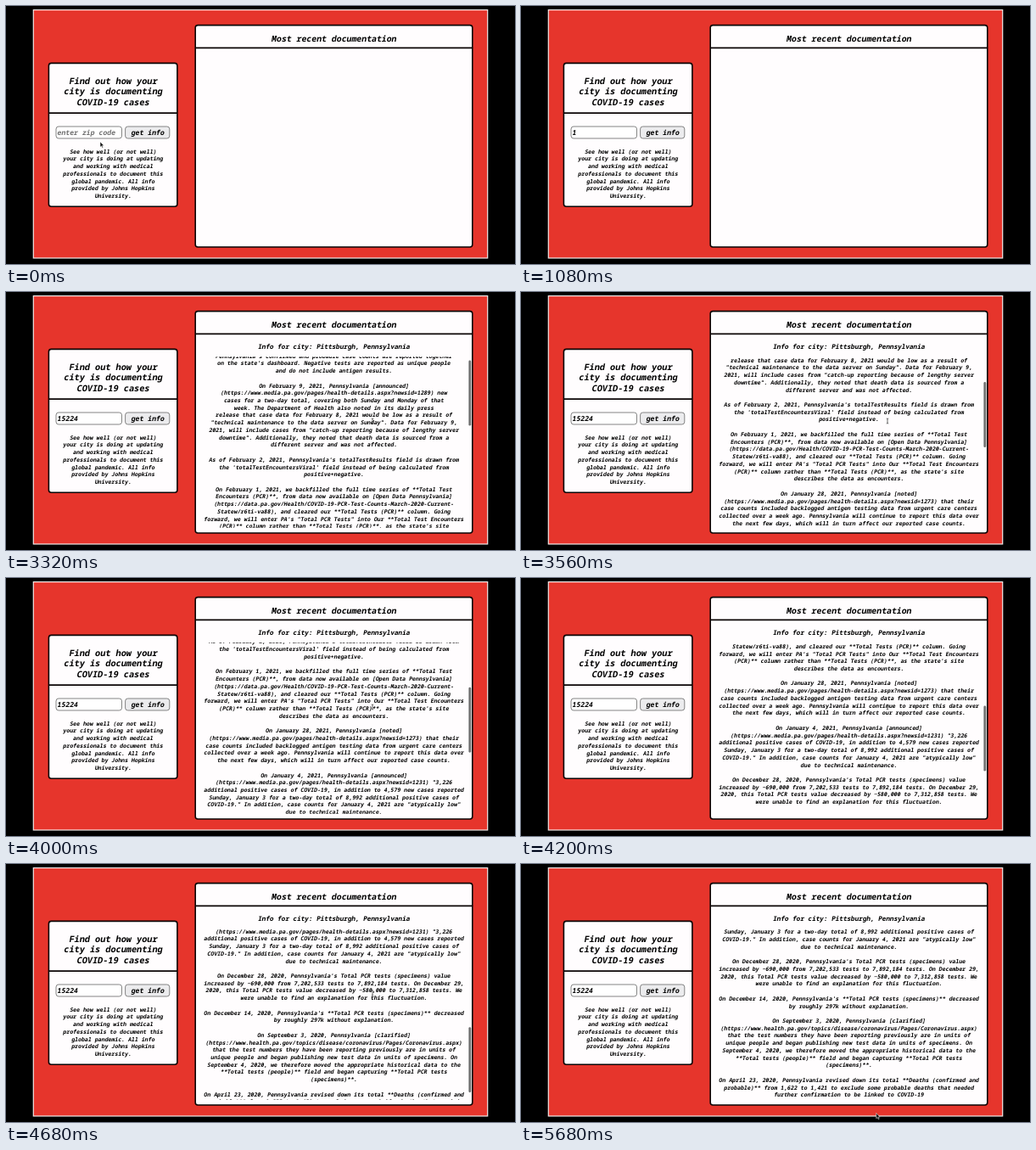
Write an HTML page that moves like this. It is 600 px wide and 304 px high and loops after 5760 ms.

```html
<!DOCTYPE html>
<html lang="en">
<head>
<meta charset="utf-8">
<title>COVID-19 documentation</title>
<style>
  html, body { margin: 0; width: 100%; height: 100%; overflow: hidden; background: #000; }
  svg { display: block; width: 600px; height: 304px; }
  text {
    font-family: "Noto Sans Mono", "DejaVu Sans Mono", monospace;
    font-weight: 700;
    text-rendering: geometricPrecision;
    white-space: pre;
  }
  .panel { fill: #fffdfe; stroke: #0a0505; stroke-width: 1.6; }
  .rule { stroke: #0a0505; stroke-width: 1.6; }
  .field { stroke: #767676; stroke-width: .9; }
</style>
</head>
<body>
<svg viewBox="0 0 600 304">
  <defs><clipPath id="view"><rect x="224" y="76.3" width="325" height="201.4"/></clipPath></defs>
  <rect width="600" height="304"/>
  <rect x="32.3" y="4.6" width="535.4" height="292.4" fill="#e6352c" stroke="#f4e9e8" stroke-width="1.2"/>

  <rect class="panel" x="50.4" y="67.4" width="151.5" height="168.8" rx="3"/>
  <path class="rule" d="M50 126.1H202"/>
  <rect class="field" id="input" x="59" y="142" width="77.5" height="14" rx="3" fill="#fff"/>
  <rect class="field" x="140.6" y="142" width="52.2" height="14" rx="3" fill="#ececee"/>
  <g id="form"></g>

  <rect class="panel" x="223.2" y="22.6" width="326.6" height="261.4" rx="3"/>
  <path class="rule" d="M223 49.4H550"/>
  <g id="results"></g>
  <g clip-path="url(#view)"><g id="notes"></g></g>
  <rect id="thumb" x="545.4" width="2.8" height="77" rx="1.4" fill="#707070"/>

  <path id="arrow" d="M0 0V6.3L1.5 5L2.5 7.3L3.5 6.9L2.5 4.6H4.5Z" fill="#111" stroke="#fff" stroke-width=".5"/>
  <path id="beam" d="M-1.2-3Q0-3 0-2.3Q0-3 1.2-3M0-2.3V2.3M-1.2 3Q0 3 0 2.3Q0 3 1.2 3" fill="none" stroke="#222" stroke-width=".7"/>
</svg>
<script>
const LOOP = 5760, STEP = 40;
const SMALL = 6.55, LEADING = 8.73, MEDIUM = 8.19;
const byId = id => document.getElementById(id);

const notes = `Pennsylvania's confirmed and probable case counts are reported together
on the state's dashboard. Negative tests are reported as unique people
and do not include antigen results.

On February 9, 2021, Pennsylvania [announced]
(https://www.media.pa.gov/pages/health-details.aspx?newsid=1289) new
cases for a two-day total, covering both Sunday and Monday of that
week. The Department of Health also noted in its daily press
release that case data for February 8, 2021 would be low as a result of
"technical maintenance to the data server on Sunday". Data for February 9,
2021, will include cases from "catch-up reporting because of lengthy server
downtime". Additionally, they noted that death data is sourced from a
different server and was not affected.

As of February 2, 2021, Pennsylvania's totalTestResults field is drawn from
the 'totalTestEncountersViral' field instead of being calculated from
positive+negative.

On February 1, 2021, we backfilled the full time series of **Total Test
Encounters (PCR)**, from data now available on [Open Data Pennsylvania]
(https://data.pa.gov/Health/COVID-19-PCR-Test-Counts-March-2020-Current-
Statew/r6ti-va88), and cleared our **Total Tests (PCR)** column. Going
forward, we will enter PA's "Total PCR Tests" into Our **Total Test Encounters
(PCR)** column rather than **Total Tests (PCR)**, as the state's site
describes the data as encounters.

On January 28, 2021, Pennsylvania [noted]
(https://www.media.pa.gov/pages/health-details.aspx?newsid=1273) that their
case counts included backlogged antigen testing data from urgent care centers
collected over a week ago. Pennsylvania will continue to report this data over
the next few days, which will in turn affect our reported case counts.

On January 4, 2021, Pennsylvania [announced]
(https://www.media.pa.gov/pages/health-details.aspx?newsid=1231) "3,226
additional positive cases of COVID-19, in addition to 4,579 new cases reported
Sunday, January 3 for a two-day total of 8,992 additional positive cases of
COVID-19." In addition, case counts for January 4, 2021 are "atypically low"
due to technical maintenance.

On December 28, 2020, Pennsylvania's Total PCR tests (specimens) value
increased by ~690,000 from 7,202,533 tests to 7,892,184 tests. On December 29,
2020, this Total PCR tests value decreased by ~580,000 to 7,312,858 tests. We
were unable to find an explanation for this fluctuation.

On December 14, 2020, Pennsylvania's **Total PCR tests (specimens)** decreased
by roughly 297k without explanation.

On September 3, 2020, Pennsylvania [clarified]
(https://www.health.pa.gov/topics/disease/coronavirus/Pages/Coronavirus.aspx)
that the test numbers they have been reporting previously are in units of
unique people and began publishing new test data in units of specimens. On
September 4, 2020, we therefore moved the appropriate historical data to the
**Total tests (people)** field and began capturing **Total PCR tests
(specimens)**.

On April 23, 2020, Pennsylvania revised down its total **Deaths (confirmed and
probable)** from 1,622 to 1,421 to exclude some probable deaths that needed
further confirmation to be linked to COVID-19`;

// Adds one slanted line of text per row; returns the last one.
function write(parent, rows, x, y, size, leading = 0, anchor = 'middle') {
  let node;
  rows.split('\n').forEach((row, i) => {
    node = document.createElementNS('http://www.w3.org/2000/svg', 'text');
    node.setAttribute('transform', `translate(${x} ${y + i * leading}) skewX(-10)`);
    node.setAttribute('font-size', size);
    node.setAttribute('text-anchor', anchor);
    node.textContent = row;
    byId(parent).append(node);
  });
  return node;
}

write('form', 'Find out how your\ncity is documenting\nCOVID-19 cases', 126, 91.5, 10.22, 12.5);
write('form', `See how well (or not well)
your city is doing at updating
and working with medical
professionals to document this
global pandemic. All info
provided by Johns Hopkins
University.`, 126, 173.5, SMALL, 8.76);
write('form', 'get info', 166.8, 152, MEDIUM);
const entry = write('form', '', 60, 152, MEDIUM, 0, 'start');
write('results', 'Most recent documentation', 386.3, 41.7, 9.83);
const city = write('results', 'Info for city: Pittsburgh, Pennsylvania', 386.3, 67, 7.66);
write('notes', notes, 386.3, 82.6, SMALL, LEADING);

// Tables of [time, value...] rows, interpolated linearly.
const scrollTrack = [
  [3280, 0], [3320, 5], [3400, 22], [3480, 47], [3560, 69.8], [3680, 94], [3800, 110],
  [3920, 121], [4000, 127.4], [4040, 135], [4120, 158], [4200, 183.1], [4320, 222],
  [4440, 252], [4560, 275], [4680, 289.1], [4800, 299], [4960, 305.9]
];
const pointerTrack = [
  [0, 111, 160], [160, 109, 158], [360, 101, 153], [600, 95.5, 149.5], [1720, 95.5, 149.5],
  [1800, 118, 147], [1920, 143, 147], [2040, 151, 149], [2160, 154, 150.5], [2760, 154, 150.5],
  [2840, 205, 146], [2920, 330, 145], [2980, 405, 149], [3040, 432, 152], [5280, 432, 152],
  [5400, 429, 185], [5520, 423, 245], [5600, 420, 280], [5680, 418.7, 293.5]
];
const keyTimes = [1080, 1320, 1440, 1560, 1680];

function sample(track, t) {
  const next = track.findIndex(row => row[0] > t);
  if (next === 0) return track[0].slice(1);
  if (next < 0) return track[track.length - 1].slice(1);
  const a = track[next - 1], b = track[next];
  const k = (t - a[0]) / (b[0] - a[0]);
  return a.slice(1).map((v, i) => v + (b[i + 1] - v) * k);
}

const show = (node, on) => node.setAttribute('visibility', on ? 'visible' : 'hidden');
const place = (node, x, y) => node.setAttribute('transform', `translate(${x} ${y})`);

function draw(t) {
  const typed = '15224'.slice(0, keyTimes.filter(k => k <= t).length);
  entry.textContent = typed || 'enter zip code';
  entry.setAttribute('fill', typed ? '#000' : '#707070');
  byId('input').setAttribute('stroke', typed ? '#555' : '#767676');

  show(city, t >= 2480);
  show(byId('notes'), t >= 2640);
  const [scroll] = sample(scrollTrack, t);
  place(byId('notes'), 0, -scroll);
  byId('thumb').setAttribute('y', 78.6 + scroll * .393);
  byId('thumb').setAttribute('opacity', Math.max(0, Math.min(1, (5600 - t) / 200)));
  show(byId('thumb'), t >= 3320);

  const [x, y] = sample(pointerTrack, t);
  const inField = x > 59 && x < 136 && y > 142 && y < 156;
  const inNotes = t >= 2640 && x > 233 && x < 540 && y > 76 && y < 278;
  const hidden = t >= 1080 && t < 1760;
  const isBeam = inField || inNotes;
  show(byId('arrow'), !hidden && !isBeam);
  show(byId('beam'), !hidden && isBeam);
  place(byId('arrow'), x, y);
  place(byId('beam'), x, y);
}

const start = performance.now();
function tick() {
  const t = (performance.now() - start) % LOOP;
  draw(Math.floor(t / STEP) * STEP);
  requestAnimationFrame(tick);
}
tick();
</script>
</body>
</html>
```
